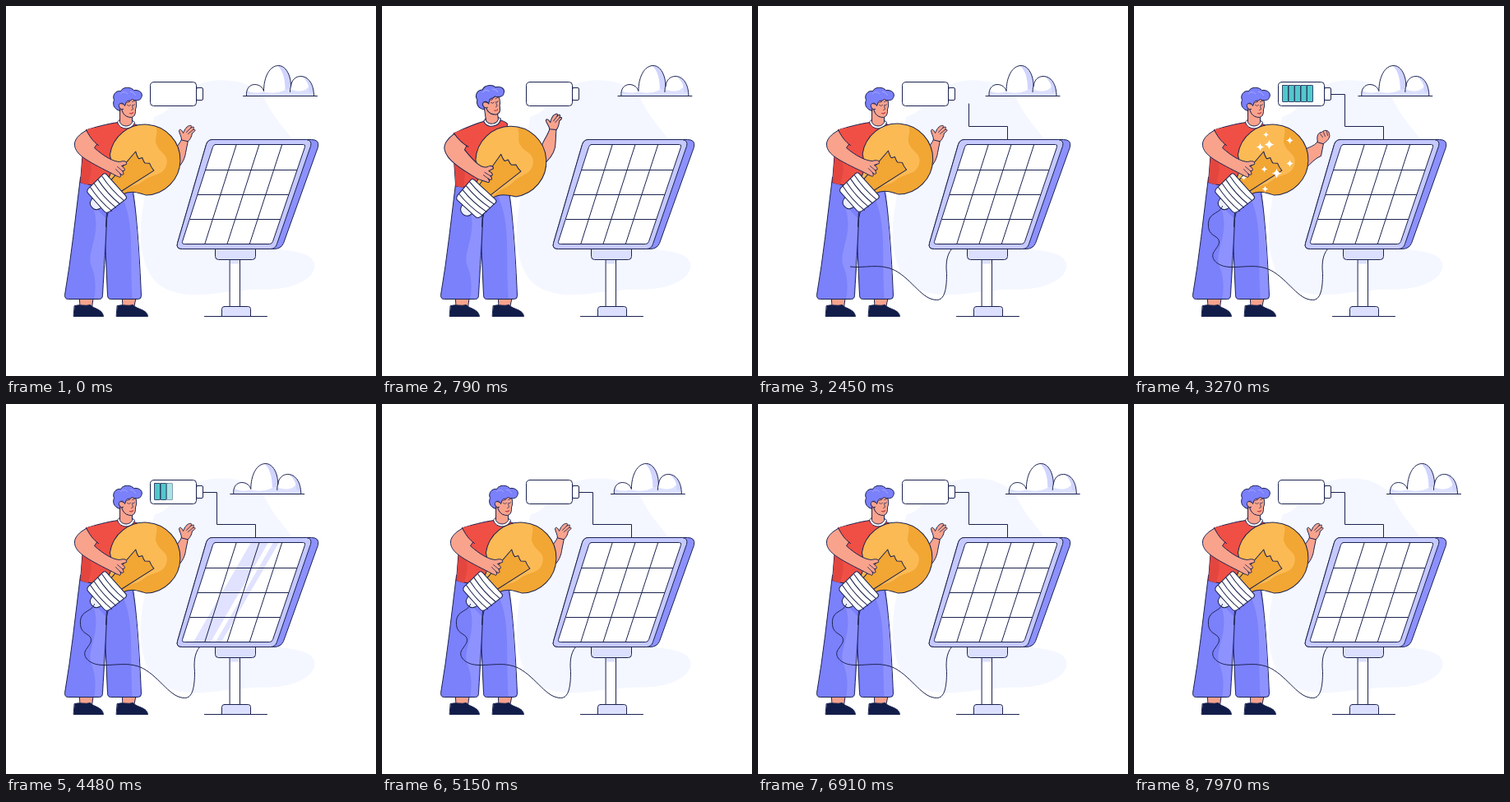
An HTML page with a canvas for the animation above (8 s loop, 450 px wide and 450 px high).

```html
<!DOCTYPE html>
<html lang="en">
<head>
<meta charset="utf-8">
<title>Solar energy</title>
<style>
  html, body { margin: 0; width: 100%; height: 100%; overflow: hidden; background: #fff; }
  canvas { display: block; width: 450px; height: 450px; }
</style>
</head>
<body>
<canvas id="stage"></canvas>
<script>
const LOOP = 8000, SIZE = 450;
const INK = '#1b2350', BLUE = '#7b80fb', PALE = '#c5c9ff', MIST = '#dce0fe';
const SKIN = '#f9a38d', RED = '#f04f45', NAVY = '#111d48', GOLD = '#fcba54', AMBER = '#f2a633';

const canvas = document.getElementById('stage');
const dpr = window.devicePixelRatio || 1;
canvas.width = canvas.height = SIZE * dpr;
const c = canvas.getContext('2d');

const clamp = v => Math.max(0, Math.min(1, v));
const ramp = (t, a, b) => clamp((t - a) / (b - a));
const ease = (t, a, b) => (1 - Math.cos(Math.PI * ramp(t, a, b))) / 2;
const bump = (t, a, m, b) => t < m ? ease(t, a, m) : 1 - ease(t, m, b);

function shape(d, fill, line = INK, width = 1) {
  const p = new Path2D(d);
  if (fill) { c.fillStyle = fill; c.fill(p); }
  if (line) { c.strokeStyle = line; c.lineWidth = width; c.stroke(p); }
}

function box(x, y, w, h, r, fill, width = 1) {
  c.beginPath();
  c.roundRect(x, y, w, h, r);
  c.fillStyle = fill;
  c.fill();
  c.strokeStyle = INK;
  c.lineWidth = width;
  c.stroke();
}

function group(draw) {
  c.save();
  draw();
  c.restore();
}

function star(x, y, r, color) {
  if (r < 0.1) return;
  const q = r * 0.14;
  c.beginPath();
  c.moveTo(x, y - r);
  c.quadraticCurveTo(x + q, y - q, x + r, y);
  c.quadraticCurveTo(x + q, y + q, x, y + r);
  c.quadraticCurveTo(x - q, y + q, x - r, y);
  c.quadraticCurveTo(x - q, y - q, x, y - r);
  c.fillStyle = color;
  c.fill();
}

// A line that draws itself from its first point
function wire(d) {
  const el = document.createElementNS('http://www.w3.org/2000/svg', 'path');
  el.setAttribute('d', d);
  const len = el.getTotalLength();
  return part => {
    if (part <= 0) return;
    group(() => {
      if (part < 1) c.setLineDash([len * part, len + 10]);
      shape(d, null);
    });
  };
}

const feed = wire('M303 162V146H256V107H239');
const cord = wire('M235 295C228 303 228 316 229 325C229 345 226 357 217 357C199 357 188 333 166 321' +
  'C146 311 126 320 109 316C98 313 92 305 97 298C101 292 105 288 102 283C98 278 91 278 90 268' +
  'C89 257 94 254 99 251C104 248 106 246 107 243');

function backdrop() {
  shape('M180 134C205 128 213 96 247 91C283 86 307 98 317 118C325 135 338 147 350 165' +
    'C356 215 312 270 335 296C356 298 375 302 375 316C374 332 348 344 318 344C272 343 232 358 200 346' +
    'C165 335 160 290 165 250C172 215 172 165 180 134Z', '#f4f7ff', null);
}

function cloud(t) {
  const dx = t < 4000 ? -17 * ease(t, 0, 4000) : -17 + 36 * ease(t, 4000, LOOP);
  group(() => {
    c.translate(dx, 0);
    const body = 'M292 109C291 100 296 95 302 95C308 95 312 99 313 103C313 86 320 72 331 72' +
      'C340 72 346 84 346 97C347 89 352 85 358 85C367 85 374 94 374 109';
    shape(body + 'Z', '#fff', null);
    group(() => {
      c.clip(new Path2D(body + 'Z'));
      shape('M290 100C297 107 306 105 313 104C322 106 334 106 342 99C352 105 365 105 369 95L378 95V109H290Z', MIST, null);
      shape('M328 71C336 76 339 88 339 101L346 100L348 76ZM357 84C365 88 369 96 368 104L378 106V84Z', '#d0d4ff', null);
    });
    shape(body, null);
    shape('M346 97C345 100 345 102 345 104', null);
    shape('M288 109H378', null);
  });
}

function battery(t) {
  box(231, 99, 8, 15, 1.5, '#fff');
  box(175, 92, 56, 29, 4, '#fff');
  for (let i = 0; i < 5; i++) {
    const on = ramp(t, 2680 + i * 100, 2800 + i * 100);
    const drop = 4080 + (4 - i) * 160;
    c.globalAlpha = on * (1 - ramp(t, drop, drop + 160));
    if (c.globalAlpha > 0) box(180 + i * 7.5, 96, 7, 20, 0.5, '#52c8cb', 0.8);
    c.globalAlpha = 1;
  }
}

function shine(p) {
  if (p <= 0 || p >= 1) return;
  const x = 112 + 240 * p;
  c.fillStyle = 'rgba(205,208,255,.62)';
  for (const [a, w] of [[0, 21], [27, 7]]) {
    c.beginPath();
    c.moveTo(x + a, 289);
    c.lineTo(x + a + 70, 168);
    c.lineTo(x + a + w + 70, 168);
    c.lineTo(x + a + w, 289);
    c.fill();
  }
}

function panel(t) {
  box(272, 307, 12, 59, 0, '#fff');
  shape('M272.5 308H283.5V313H272.5Z', MIST, null);
  box(262, 365, 35, 12, [3, 3, 0, 0], MIST);
  shape('M241 377H317', null);
  box(254, 295, 49, 13, [0, 0, 4, 4], MIST);
  shape('M250 162H371Q381 162 379 171L337 288Q334 295 325 295H214Q206 295 208 288L243 168Q245 162 250 162Z', '#8d91ff');
  shape('M250 162H365Q372 163 370 170L329 289Q327 295 321 295H214Q206 295 208 288L243 168Q245 162 250 162Z', PALE);
  const glass = 'M254 168H361Q364 168 363 171L324 286Q323 289 320 289H217Q213 289 214 286L251 171Q252 168 254 168Z';
  shape(glass, '#fff', null);
  group(() => {
    c.clip(new Path2D(glass));
    shine(ramp(t, 1000, 2000));
    shine(ramp(t, 4000, 5000));
  });
  for (let i = 1; i < 4; i++) {
    const k = i / 4, y = 169 + 30 * i;
    shape(`M${252 + 111 * k} 168L${214 + 109 * k} 289`, null);
    shape(`M${252 - 38 * k} ${y}H${363 - 40 * k}`, null);
  }
  shape(glass, null);
  const glow = bump(t, 1450, 1800, 2250);
  star(345, 188, 6 * glow, '#f7a83a');
  star(270, 296, 6 * glow, '#f7a83a');
}

function legs() {
  shape('M89 352H106L104 366H90Z', SKIN);
  shape('M141 352H158L155 367H142Z', SKIN);
  shape('M83 364C90 362 96 365 102 363C106 368 117 368 118 377H82Z', NAVY);
  shape('M135 364C142 362 148 365 154 363C159 369 171 368 172 377H134Z', NAVY);
  shape('M119 215L152 215C158 240 162 305 164 352Q164 356 160 356H127Q123 356 123 351L119 262Z', BLUE);
  shape('M138 226C156 260 150 290 153 355H160Q163 355 163 351C162 305 159 255 152 226Z', '#8e92ff', null);
  shape('M90 208C84 255 79 305 71 351Q71 356 75 356H113Q117 356 117 351C119 315 121 289 122 258L132 212Z', BLUE);
  shape('M104 240C118 275 97 297 103 315C110 332 108 345 107 355H113Q116 355 116 350L121 258Z', '#8e92ff', null);
  shape('M122 250L121 268', null);
}

function farArm(fist) {
  const dx = 9 * fist, dy = 4 * fist;
  const p = (x, y) => `${x + dx} ${y + dy} `;
  shape('M' + p(214, 160) + 'C' + p(211, 167) + '206 172 202 178L196 190L203 201C212 195 217 186 ' +
    p(218, 178) + 'L' + p(221, 163) + 'Z', SKIN);
  group(() => {
    c.translate(dx, dy);
    if (fist > 0.5) {
      shape('M214 161C212 153 215 149 219 149C223 145 228 147 228 151C230 156 225 160 221 163Z', SKIN);
      shape('M217 151L220 155M221 149L223 154M225 148L226 153', null, INK, 0.8);
    } else {
      shape('M213 162C213 158 210 154 210 151C211 148 214 151 215 154C217 149 220 145 223 145' +
        'C226 144 225 147 224 148C228 145 229 147 227 150C231 149 230 152 226 154C225 159 224 161 221 164Z', SKIN);
      shape('M219 153L224 148M221 155L227 150', null, INK, 0.8);
    }
  });
}

function torso() {
  shape('M136 141C121 143 108 147 98 150C92 154 90 164 93 175L90 214C108 220 135 221 152 216L163 148C158 142 151 141 136 141Z', RED);
  shape('M93 180C106 188 105 199 99 217C94 216 90 214 90 214Z', '#e2463f', null);
}

function head() {
  shape('M135 141C138 151 153 151 156 141L151 137H139Z', '#fff');
  shape('M138 121L138 141C141 147 150 147 153 141L153 131Z', SKIN);
  shape('M140 113C138 128 143 135 152 135C157 134 157 129 157 125C159 121 158 115 156 109Z', SKIN);
  shape('M138 127C130 125 129 118 131 114C128 107 134 102 139 103C142 97 152 98 155 102' +
    'C162 101 167 106 164 111C163 115 156 115 153 113C150 116 147 114 146 116L144 121C142 116 137 117 138 122Z', BLUE);
  shape('M139 106Q143 102 147 106M151 104Q155 104 157 108', null, '#a5a8ff', 1);
  shape('M142 119C138 116 135 120 138 124Q140 126 142 125', SKIN);
  shape('M147 120Q149 122 151 120M153 120Q155 122 156 119M147 117L150 116M153 116L156 115M153 121L154 125L152 126', null, INK, 0.7);
  shape('M150 130Q153 131 154 129', null, '#b92f39', 1.1);
}

function bulb(x, y, lean, t) {
  const tilt = 2.41 + 0.05 * lean;
  group(() => {
    c.translate(x, y);
    c.rotate(tilt);
    shape('M76 -8Q86 -8 86 0Q86 8 76 8Z', '#eef0ff');
    const glass = 'M48 -13C36 -16 31 -26 27 -33A43 43 0 1 0 27 33C31 26 36 16 48 13Z';
    shape(glass, GOLD, null);
    group(() => {
      c.clip(new Path2D(glass));
      c.rotate(-tilt);
      shape('M11 -45C20 -34 10 -26 15 -18C19 -8 29 -8 27 4C25 19 8 17 -1 25C-9 32 -20 30 -29 40L45 48V-45Z', AMBER, null);
    });
    shape(glass, null);
    shape('M48 9L1 15Q4 9 4 6L0 4Q2 0 2 -3L-2 -7Q0 -12 0 -17L48 -9', AMBER);
    shape('M49 -20Q46 -20 46 -17V18Q46 21 49 21L74 20Q78 19 78 16V-14Q78 -17 74 -18Z', '#fff');
    for (let i = 1; i < 5; i++) {
      const s = 45 + i * 6.5;
      shape(`M${s} -19.5Q${s + 3} 0 ${s} 20`, null);
    }
  });
  const stars = [[-15, -16, 5], [-8, -31, 3.5], [-4, -19, 6], [21, -24, 4.5], [21, 4, 4.5], [5, 16, 6], [-10, 11, 4], [-9, 35, 4], [-35, 21, 4]];
  stars.forEach(([sx, sy, r], i) => {
    const s = bump(t, 2850 + i * 20, 3230 + i * 10, 4100 + i * 20);
    star(x + sx, y + sy, r * s, '#fff');
  });
}

function nearArm(dx, dy) {
  const p = (x, y, k = 1) => `${x + dx * k} ${y + dy * k} `;
  shape('M97 151C89 155 82 162 83 169C84 180 ' + p(98, 188, 0.4) + p(126, 202) +
    'C' + p(130, 204) + p(133, 206) + p(136, 207) +
    'C' + p(139, 209) + p(140, 206) + p(138, 203) +
    'C' + p(142, 207) + p(144, 204) + p(141, 200) +
    'C' + p(145, 201) + p(145, 197) + p(140, 194) +
    'L' + p(146, 192) + 'C' + p(147, 189) + p(144, 187) + p(138, 189) +
    'C' + p(130, 189) + p(118, 182, 0.4) + '107 172L112 165Z', SKIN);
  shape('M' + p(138, 203) + 'L' + p(133, 198) + 'M' + p(141, 200) + 'L' + p(135, 195), null, INK, 0.8);
  shape('M111 147C104 148 100 149 97 150C101 158 105 164 112 169C118 164 121 158 121 151Z', RED, null);
  shape('M97 150C101 158 105 164 112 169', null);
}

function person(t) {
  const lean = bump(t, 0, 900, 1800);
  const reach = bump(t, 1000, 1800, 2600);
  const fist = bump(t, 2500, 3230, 4100);
  const dx = 9 * reach - 8 * lean, dy = 8 * lean - 12 * reach;
  legs();
  group(() => {
    c.translate(120, 222);
    c.rotate(-0.15 * lean);
    c.translate(-120, -222);
    farArm(fist);
    torso();
    head();
    bulb(168 + dx, 187 + dy, lean, t);
    nearArm(dx, dy);
  });
}

function draw(t) {
  c.setTransform(dpr, 0, 0, dpr, 0, 0);
  c.fillStyle = '#fff';
  c.fillRect(0, 0, SIZE, SIZE);
  c.translate(0.5, 0.5);
  c.lineJoin = c.lineCap = 'round';
  backdrop();
  cloud(t);
  feed(ramp(t, 1500, 2750));
  panel(t);
  battery(t);
  person(t);
  cord(ramp(t, 1500, 2950));
}

const start = performance.now();
function tick() {
  draw((performance.now() - start) % LOOP);
  requestAnimationFrame(tick);
}
tick();
</script>
</body>
</html>
```
